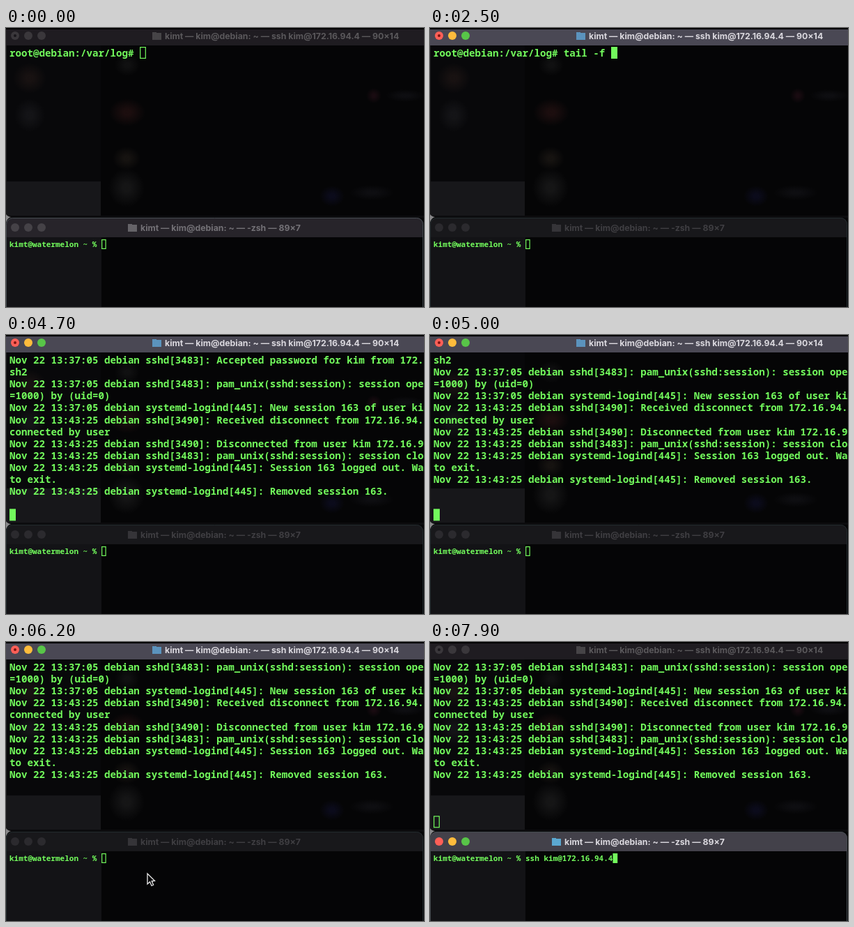
Recreate the animation shown at these times as an HTML page with a canvas. Size 600 by 400 pixels, loop 8000 ms.

```html
<!DOCTYPE html>
<html lang="en">
<head>
<meta charset="utf-8">
<title>Two terminals</title>
<style>
html, body { margin: 0; width: 100%; height: 100%; overflow: hidden; background: #000; }
canvas { display: block; width: 600px; height: 400px; }
</style>
</head>
<body>
<canvas id="stage" width="600" height="400"></canvas>
<script>
const ctx = document.getElementById('stage').getContext('2d');
const LOOP = 8000, STEP = 100;
const GREEN = '#72fa5c';
const MONO = '"Noto Sans Mono", "DejaVu Sans Mono", monospace';
const BIG = { size: 14.17, pitch: 8.5, line: 17.1, base: 41 };
const SMALL = { size: 11, pitch: 6.6, base: 314 };

const PROMPT = 'root@debian:/var/log# ';
const HOST_PROMPT = 'kimt@watermelon ~ % ';
const LOGIN = 'ssh kim@172.16.94.4';
const stamp = (time, rest) => `Nov 22 13:${time} debian ${rest}`;
const LOG = [
  stamp('36:58', 'sshd[3471]: pam_unix(sshd:session): session closed for user'),
  stamp('37:05', 'sshd[3483]: Accepted password for kim from 172.16.94.1 port'),
  'sh2',
  stamp('37:05', 'sshd[3483]: pam_unix(sshd:session): session opened for user'),
  '=1000) by (uid=0)',
  stamp('37:05', 'systemd-logind[445]: New session 163 of user kim.'),
  stamp('43:25', 'sshd[3490]: Received disconnect from 172.16.94.1 port 501'),
  'connected by user',
  stamp('43:25', 'sshd[3490]: Disconnected from user kim 172.16.94.1 port'),
  stamp('43:25', 'sshd[3483]: pam_unix(sshd:session): session closed for'),
  stamp('43:25', 'systemd-logind[445]: Session 163 logged out. Waiting for'),
  'to exit.',
  stamp('43:25', 'systemd-logind[445]: Removed session 163.')
];

const clamp = v => Math.max(0, Math.min(1, v));
const ease = v => v * v * (3 - 2 * v);
const mix = (a, b, v) => a + (b - a) * v;
const typed = (text, t, start, gap) =>
  text.slice(0, Math.max(0, Math.floor((t - start) / gap) + 1));

function rect(color, x, y, w, h) {
  ctx.fillStyle = color;
  ctx.fillRect(x, y, w, h);
}

function dot(color, x, y, r) {
  ctx.fillStyle = color;
  ctx.beginPath();
  ctx.arc(x, y, r, 0, 7);
  ctx.fill();
}

function write(text, x, y, font, color) {
  ctx.font = font;
  ctx.fillStyle = color;
  ctx.fillText(text, x, y);
}

function glow(x, y, rx, ry, rgb, alpha) {
  ctx.save();
  ctx.translate(x, y);
  ctx.scale(rx, ry);
  const g = ctx.createRadialGradient(0, 0, 0.2, 0, 0, 1);
  g.addColorStop(0, `rgba(${rgb},${alpha})`);
  g.addColorStop(1, `rgba(${rgb},0)`);
  ctx.fillStyle = g;
  ctx.fillRect(-1, -1, 2, 2);
  ctx.restore();
}

// Dim blurred desktop showing through the windows
function backdrop() {
  rect('#050506', 0, 0, 600, 400);
  rect('#08080a', 0, 25, 136, 195);
  rect('#17171a', 0, 220, 136, 50);
  rect('#131316', 0, 300, 137, 100);
  glow(34, 72, 24, 22, '60,40,34', 0.3);
  glow(34, 125, 22, 24, '55,55,60', 0.25);
  glow(174, 53, 18, 16, '50,50,50', 0.25);
  glow(174, 121, 26, 20, '75,32,32', 0.32);
  glow(173, 187, 20, 17, '60,50,40', 0.3);
  glow(173, 229, 26, 28, '55,55,55', 0.32);
  glow(528, 97, 11, 11, '70,25,40', 0.3);
  glow(573, 97, 28, 9, '40,40,50', 0.25);
  glow(468, 241, 18, 15, '25,25,75', 0.3);
  glow(525, 236, 32, 11, '40,40,50', 0.25);
}

const LOOKS = {
  idle:   { bar: '#1f1c21', text: '#5a585b', icon: '#464447', light: '#3a373b' },
  soft:   { bar: '#27242a', text: '#737176', icon: '#656368', light: '#454247' },
  faint:  { bar: '#18181b', text: '#3f3e42', icon: '#353438', light: '#2b2a2e' },
  active: { bar: '#4a4854', text: '#dad8de', icon: '#5b93bd' },
  front:  { bar: '#43414a', text: '#dad8de', icon: '#5ba8d0' }
};

function titleBar(look, x, y, title, marked) {
  const { bar, text, icon, light } = LOOKS[look];
  const isLow = y > 200;
  ctx.fillStyle = bar;
  ctx.beginPath();
  ctx.roundRect(0, isLow ? 272 : 2, isLow ? 599 : 600, isLow ? 28 : 23, isLow ? [9, 9, 0, 0] : 0);
  ctx.fill();
  ['#ff5f57', '#febc3c', '#58c548'].forEach((c, i) => dot(light || c, 13 + 19 * i, y, 6));
  if (marked) dot(light ? '#18161a' : '#7e1512', 13, y, 2);
  rect(icon, x - 18, y - 5, 6, 3);
  rect(icon, x - 18, y - 4, 13, 10);
  write(title, x, y + 4.5, 'bold 12.3px Inter, sans-serif', text);
}

function frames(state) {
  rect('#000', 0, 0, 600, 2);
  rect('#1a1a1c', 0, 25, 1, 245);
  rect('#0c0c0e', 0, 269, 600, 3);
  ctx.fillStyle = '#88888a';
  ctx.beginPath();
  ctx.moveTo(0, 267);
  ctx.quadraticCurveTo(2, 270, 7, 271);
  ctx.quadraticCurveTo(1, 273, 0, 280);
  ctx.fill();
}

function lowBorder(state) {
  ctx.strokeStyle = state === 'top' ? '#222a2d' : '#454b50';
  ctx.lineWidth = 1;
  ctx.beginPath();
  ctx.roundRect(0.5, 272.5, 598, 140, 9);
  ctx.stroke();
}

function caret(x, y, w, h, solid) {
  if (solid) return rect(GREEN, x, y, w, h);
  ctx.strokeStyle = GREEN;
  ctx.lineWidth = 1.2;
  ctx.strokeRect(x + 0.7, y + 0.6, w - 1.4, h - 1.2);
}

function line(text, row) {
  write(text, 5, BIG.base + row * BIG.line, `600 ${BIG.size}px ${MONO}`, GREEN);
}

// Carets blink once a second, and stay lit just after a key press
const lit = (t, since) => (t - since) % 1000 < 600;

function topTerminal(t, state) {
  let col, row, since;
  if (t < 4100) {
    const command = typed('tail -f ', t, 1800, 80) + typed('auth.log', t, 2800, 100);
    line(PROMPT + command, 0);
    if (t >= 3900) write('[', 0, 40, `12px ${MONO}`, '#6a9a5a');
    col = PROMPT.length + command.length;
    row = 0;
    since = t < 1800 ? 700 : t < 2800 ? 2400 : 3500;
  } else {
    const enters = [4600, 4900, 5300].filter(e => t >= e).length;
    LOG.slice(enters).forEach(line);
    col = 0;
    row = 13;
    since = t < 5300 ? t : 5300;
  }
  const focused = state === 'top';
  if (!focused || lit(t, since))
    caret(5 + col * BIG.pitch, 27 + row * BIG.line, 9, 17, focused);
}

function lowTerminal(t, state) {
  const text = HOST_PROMPT + typed(LOGIN, t, 6800, 58);
  write(text, 5, SMALL.base, `600 ${SMALL.size}px ${MONO}`, GREEN);
  caret(5 + text.length * SMALL.pitch, 303, 6.8, 14, state === 'low');
}

function arrow(x, y) {
  ctx.beginPath();
  [[0, 0], [0, 15], [3.5, 11.8], [6, 17.5], [8.6, 16.3], [6.2, 10.8], [10.5, 10.5]]
    .forEach(([dx, dy]) => ctx.lineTo(x + dx, y + dy));
  ctx.closePath();
  ctx.fillStyle = '#060607';
  ctx.fill();
  ctx.strokeStyle = '#ececec';
  ctx.lineWidth = 1.3;
  ctx.stroke();
}

function beam(x, y) {
  const path = new Path2D(`M${x - 4} ${y - 8}q4 0 4 3v10q0 3 -4 3M${x + 4} ${y - 8}q-4 0 -4 3v10q0 3 4 3M${x - 2} ${y + 2}h4`);
  [['#ececec', 3.8], ['#101012', 1.2]].forEach(([color, width]) => {
    ctx.strokeStyle = color;
    ctx.lineWidth = width;
    ctx.stroke(path);
  });
}

function pointer(t, state) {
  const arriving = t >= 200 && t < 1800;
  const leaving = t >= 5500 && t < 6800;
  if (!arriving && !leaving) return;
  const v = ease(clamp(arriving ? (t - 200) / 800 : (t - 5500) / 600));
  const x = arriving ? mix(330, 479.5, v) : mix(479.5, 203, v);
  const y = arriving ? mix(360, 103, v) : mix(103, 332, v);
  const over = y > 270 ? 'low' : 'top';
  (over === state ? beam : arrow)(x, y);
}

function draw(t) {
  const state = t < 1000 ? 'none' : t < 6500 ? 'top' : 'low';
  backdrop();
  frames(state);
  titleBar(state === 'top' ? 'active' : 'idle', 228, 11,
    'kimt — kim@debian: ~ — ssh kim@172.16.94.4 — 90×14', true);
  titleBar({ none: 'soft', top: 'faint', low: 'front' }[state], 193, 286,
    'kimt — kim@debian: ~ — -zsh — 89×7', false);
  lowBorder(state);
  topTerminal(t, state);
  lowTerminal(t, state);
  pointer(t, state);
}

const start = performance.now();
function tick() {
  const t = (performance.now() - start) % LOOP;
  draw(Math.floor(t / STEP) * STEP);
  requestAnimationFrame(tick);
}
tick();
</script>
</body>
</html>
```
